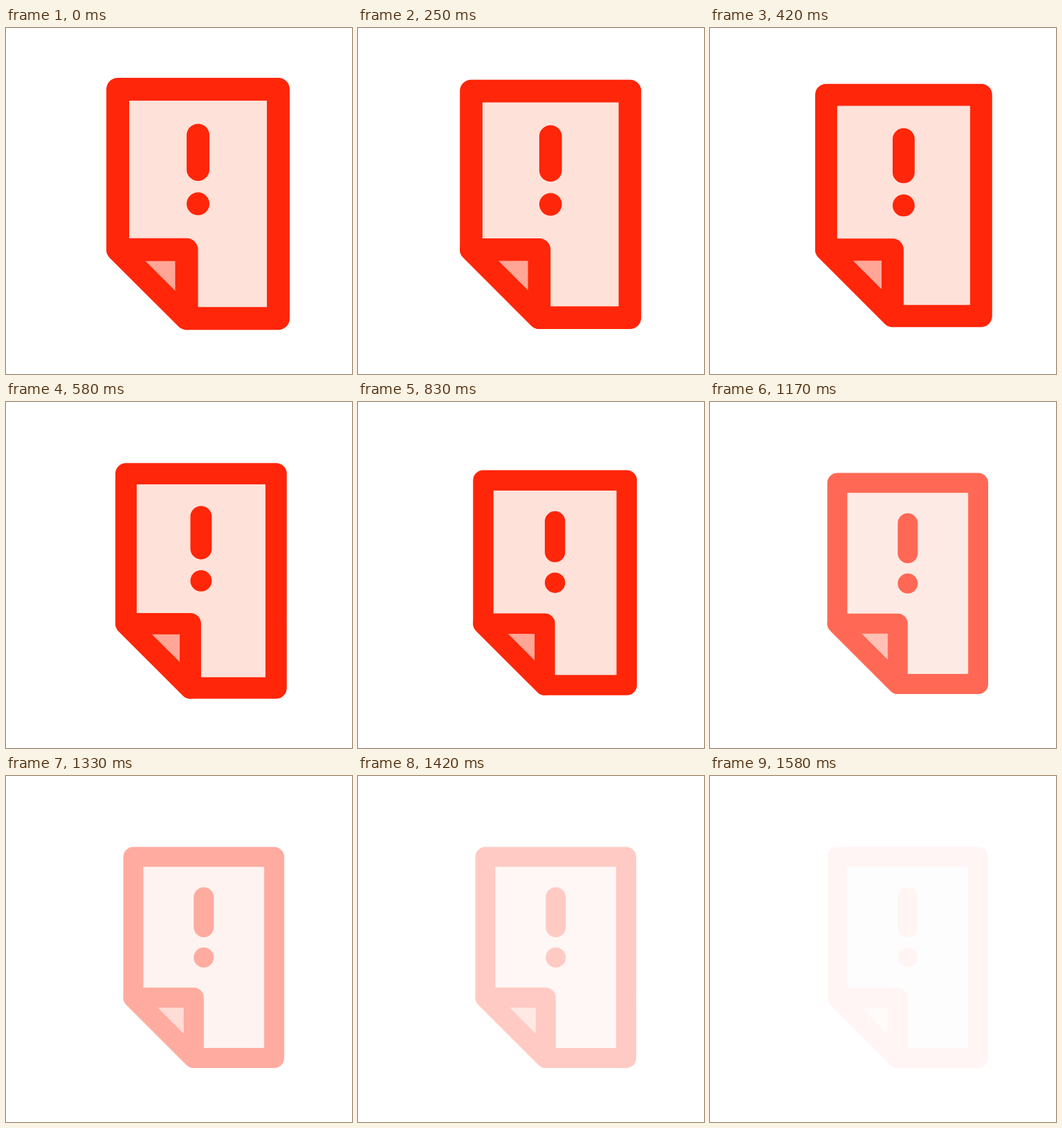
Write an HTML page that moves like this. It is 500 px wide and 500 px high and loops after 2580 ms.

```html
<!DOCTYPE html>
<html lang="en">
<head>
<meta charset="utf-8">
<title>Alert note</title>
<style>
  html, body { margin: 0; height: 100%; overflow: hidden; background: #fff; }
  svg { display: block; width: 100%; height: 100%; }
</style>
</head>
<body>
<svg viewBox="0 0 500 500">
  <g id="note" fill="none" stroke="#ff2609" stroke-width="33" stroke-linecap="round" stroke-linejoin="round">
    <path fill="#fee1d9" stroke="none" d="M161.5 88.5H393.5V419.7H261V320.3H161.5Z"/>
    <path fill="#ffa696" d="M161.5 320.3H261V419.7Z"/>
    <path d="M161.5 88.5H393.5V419.7H261L161.5 320.3Z"/>
    <path d="M277.5 155V204.4M277.5 254.1V254.11"/>
  </g>
</svg>
<script>
  const LOOP = 2580, STEP = 1000 / 12, LAST = 19;
  const note = document.getElementById('note');

  // Sine ease from 0 to 1, measured in steps.
  function ease(n, start, length) {
    const p = Math.min(1, Math.max(0, (n - start) / length));
    return (1 - Math.cos(Math.PI * p)) / 2;
  }

  function draw(now) {
    // Twelve steps a second, then the last one holds.
    const n = Math.min(LAST, Math.floor((now % LOOP + 4) / STEP));
    const scale = 1 - 0.1225 * ease(n, 0.6, 12.3);
    note.setAttribute('transform', `translate(345 320.3) scale(${scale}) translate(-345 -320.3)`);
    note.setAttribute('opacity', 1 - ease(n, 10.24, 10));
  }

  const begin = performance.now();
  function tick() {
    draw(performance.now() - begin);
    requestAnimationFrame(tick);
  }
  tick();
</script>
</body>
</html>
```
